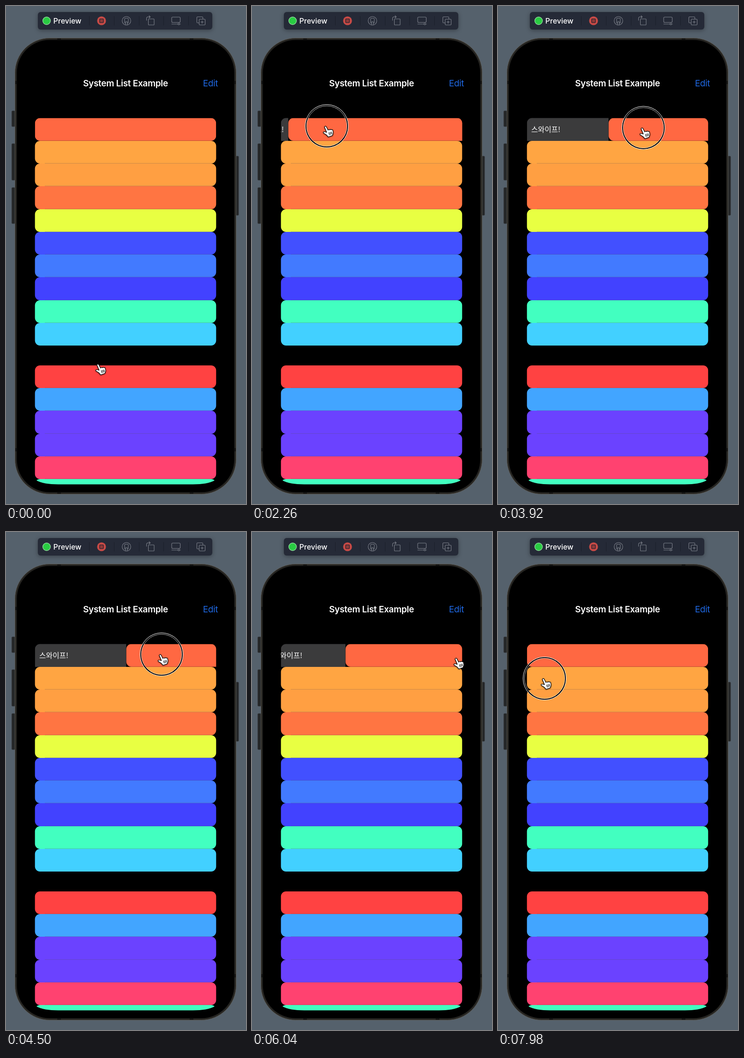
Recreate the animation shown at these times as an HTML page. Size 520x1078 px, loop 8000 ms.

```html
<!DOCTYPE html>
<html lang="en">
<head>
<meta charset="utf-8">
<style>
  html, body { margin: 0; width: 100%; height: 100%; overflow: hidden; background: #55616c; }
  svg { display: block; width: 520px; height: 1078px; }
  text { font-family: Inter, Roboto, sans-serif; fill: #fff; }
  .swipe { font-family: "Noto Sans CJK KR", "Noto Sans CJK", sans-serif; font-size: 15.75px; }
  .icon { fill: none; stroke: #7d818b; stroke-width: 1.1; stroke-linecap: round; stroke-linejoin: round; }
  .bar { filter: drop-shadow(0 2px 5px #0005); }
  #hand { filter: drop-shadow(0 1.5px 1px #0008); }
</style>
</head>
<body>
<svg viewBox="0 0 520 1078">
  <defs>
    <clipPath id="cell"><path d="M62.7 292V253.500a11 11 0 0 1 11-11H444.300a11 11 0 0 1 11 11V292z"/></clipPath>
    <clipPath id="screen"><path d="M0 0H520V1024H455L452 1027Q436 1035.500 405 1035.500H113Q82 1035.500 66 1027L63 1024H0z"/></clipPath>
  </defs>

  <!-- toolbar -->
  <rect class="bar" x="69" y="13" width="378" height="38" rx="6" fill="#252a37"/>
  <circle cx="88" cy="32" r="8.3" fill="#29cb42" stroke="#8bd698" stroke-width="1.4"/>
  <text x="102.5" y="38" font-size="16" font-weight="500">Preview</text>
  <path d="M180.5 22V42M234.5 22V42M288.5 22V42M341.5 22V42M395.5 22V42" stroke="#1b1f2a"/>
  <circle cx="207" cy="32" r="9.6" fill="#c74a46"/>
  <rect x="203" y="28" width="8" height="8" rx="1" fill="#8f3a3a" stroke="#3a2730" stroke-width="1.6"/>
  <g class="icon">
    <circle cx="261" cy="32" r="9.3"/>
    <path d="M259 37H258.500a1.500 1.500 0 0 1-1.500-1.500V28a1.500 1.500 0 0 1 1.500-1.500H263.500a1.500 1.500 0 0 1 1.500 1.500V35.500a1.500 1.500 0 0 1-1.500 1.500H263M259 41V34H263V41"/>
    <rect x="308.5" y="28" width="12.5" height="13" rx="1"/>
    <path d="M304.5 31V27Q304.5 23.5 308 23.5H312M310 21L312.5 23.5L310 26"/>
    <rect x="359" y="24" width="18.5" height="11.5" rx="2"/>
    <path d="M359 39H372M376.5 39H378"/><circle cx="374.3" cy="39" r="1.8"/>
    <path d="M418 36.5H415a1.5 1.5 0 0 1-1.5-1.5V25a1.5 1.5 0 0 1 1.5-1.5H425a1.5 1.5 0 0 1 1.5 1.5V28"/>
    <rect x="418.5" y="28.5" width="13" height="12.5" rx="1.5"/>
    <path d="M425 32V37.5M422.2 34.75H427.8"/>
  </g>

  <!-- phone -->
  <g fill="#252728" stroke="#34373a" stroke-width=".8">
    <rect x="12.5" y="227" width="7" height="34" rx="1.5"/>
    <rect x="12.5" y="298" width="7" height="79" rx="1.5"/>
    <rect x="12.5" y="393" width="7" height="78" rx="1.5"/>
    <rect x="498" y="325" width="6" height="128" rx="1.5"/>
  </g>
  <rect x="19.5" y="69.5" width="479" height="987" rx="75" fill="#252421" stroke="#57544d"/>
  <path d="M111 71.5H119M398 71.5H406M111 1054.5H119M398 1054.5H406M21.5 162V169M21.5 957V964M496.5 162V169M496.5 957V964" stroke="#111" stroke-width="3"/>
  <rect x="23.5" y="73.5" width="471" height="979" rx="71"/>
  <text x="167" y="174" font-size="19" font-weight="600" letter-spacing="-.3">System List Example</text>
  <text x="426.7" y="174" font-size="19" letter-spacing="-.4" style="fill:#1f68e2">Edit</text>

  <g id="rows" clip-path="url(#screen)"></g>
  <g clip-path="url(#cell)">
    <rect id="action" x="62.7" y="242" height="50" fill="#3b3b3c"/>
    <text id="label" class="swipe" y="273">스와이프!</text>
    <g id="top">
      <path d="M62.7 242H75V292H62.7z"/>
      <rect x="62.7" y="242.5" width="392.6" height="49.3" rx="11" fill="#ff6842"/>
      <path id="square" d="M430 242.5H455.3V291.8H430z" fill="#ff6842"/>
    </g>
  </g>

  <!-- pointer -->
  <g id="pointer">
    <g id="ring" fill="none">
      <circle r="45.2" stroke="#000" stroke-width="2.6"/>
      <circle r="46.7" stroke="#fff" stroke-width="1"/>
      <circle r="43.7" stroke="#fff" stroke-width=".7"/>
    </g>
    <g id="hand" transform="translate(-1.5 -1)" stroke="#000" stroke-width="1.2" stroke-linejoin="round" stroke-linecap="round">
      <path fill="#fff" d="M-3.5 3Q-2.5 0 .3 2L4.3 9.8Q6 7.5 8 9.3Q10 7.3 11.8 9Q14 8 14.8 10.5L15.5 15.5Q15.3 18.5 13.5 21.5L4.5 24.5Q1.5 19.5-5 16.5Q-7.5 13.5-4 13L1.3 14.5z"/>
      <path fill="none" d="M6 15L7.5 20M8.8 14.2L10.2 19.2M11.5 13.5L12.7 18"/>
    </g>
  </g>
</svg>
<script>
const $ = id => document.getElementById(id);
const LOOP = 8000, ROW = 49.27;

const groups = [
  [242.5, '#ff6842 #ffa542 #ff9f42 #ff7542 #e8ff42 #4250ff #427aff #4242ff #42ffc0 #42d0ff'],
  [777.8, '#ff4242 #42a5ff #6b42ff #6b42ff #ff4270 #42ffc0']
];
let html = '';
groups.forEach(([top, colors], g) => colors.split(' ').forEach((color, i) => {
  if (!g && !i) return; // the swiped row is drawn separately
  const y = Math.round(top + i * ROW), end = Math.round(top + (i + 1) * ROW);
  html += `<rect x="62.7" y="${y}" width="392.6" height="${end - y}" rx="11" fill="${color}"/>`;
  if (i > 1 || g && i) html += `<path d="M84 ${y - .5}H446" stroke="#555" stroke-opacity=".3"/>`;
}));
$('rows').innerHTML = html;

// keys: [time, ...values]
const pointerKeys = [
  [0, 202, 775], [680, 277, 287], [1500, 150, 262], [1950, 146, 260], [2260, 162, 260],
  [2960, 268, 261], [4500, 337, 265], [5800, 445, 273], [6040, 445, 273],
  [7500, 97, 318], [7980, 101, 317], [LOOP, 101, 317]
];
// row offset, label retreat
const swipeKeys = [
  [0, 0, 0], [1950, 0, 0], [2260, 16, 0], [2960, 132, 0], [4500, 198, 0],
  [5800, 290, 0], [6040, 140, 26], [6400, 0, 83], [LOOP, 0, 83]
];

function sample(keys, t) {
  const i = keys.findIndex(k => k[0] > t), a = keys[i - 1], b = keys[i];
  const u = (t - a[0]) / (b[0] - a[0]), e = u * u * (3 - 2 * u);
  return a.slice(1).map((v, j) => v + (b[j + 1] - v) * e);
}

function draw(now) {
  const t = now % LOOP;
  const [x, y] = sample(pointerKeys, t);
  const [offset, retreat] = sample(swipeKeys, t);
  $('pointer').setAttribute('transform', `translate(${x} ${y})`);
  $('ring').style.display = t > 1900 && t < 5850 || t > 7850 ? '' : 'none';
  $('top').setAttribute('transform', `translate(${offset})`);
  $('action').setAttribute('width', offset);
  $('label').setAttribute('x', Math.min(offset - 10, 72 - retreat));
  $('square').style.display = offset > .1 ? '' : 'none';
  requestAnimationFrame(draw);
}
requestAnimationFrame(draw);
</script>
</body>
</html>
```
